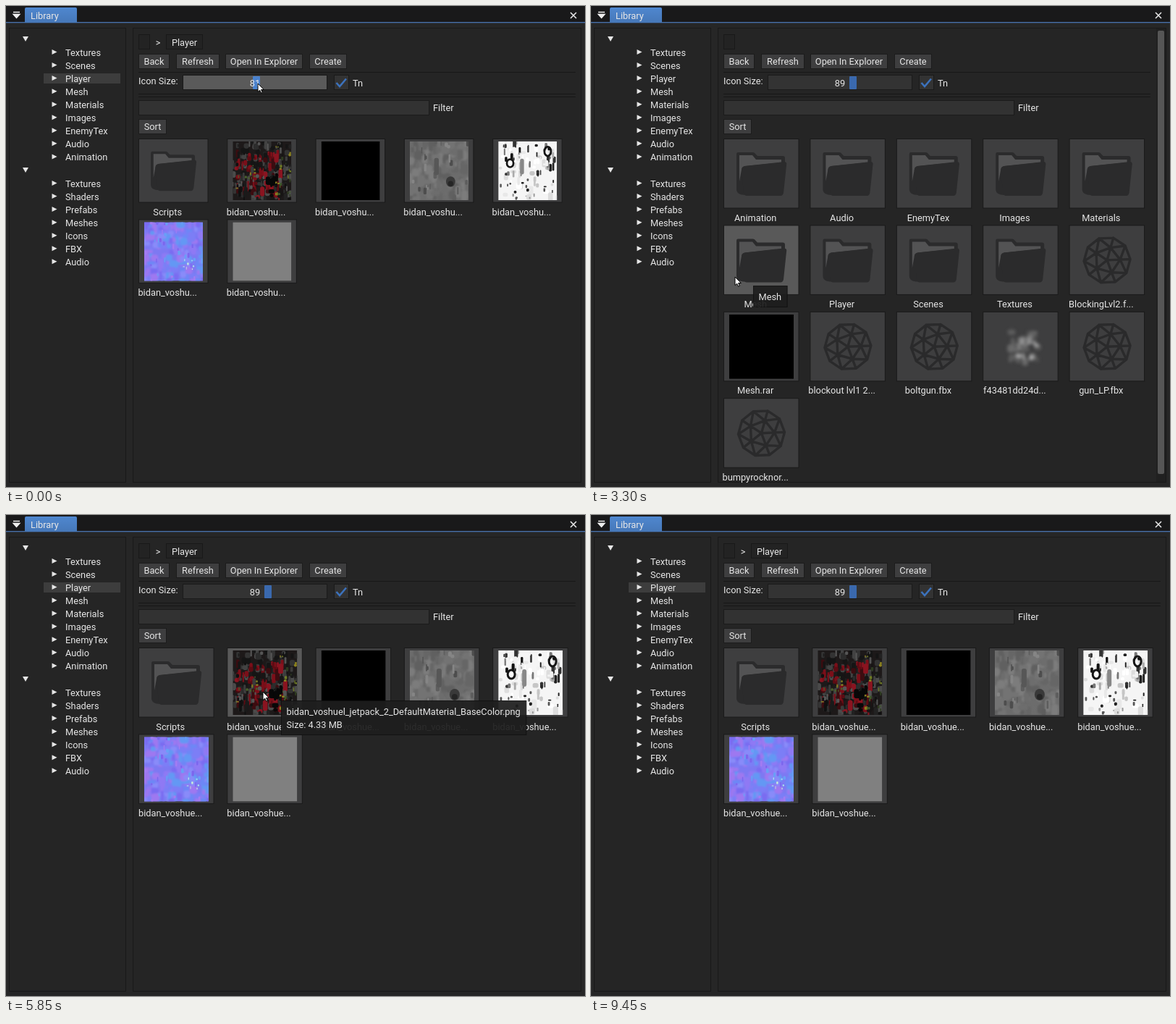
Animation, 800 px wide and 664 px high, one loop 9700 ms. Source, as an HTML page:

```html
<!DOCTYPE html>
<html lang="en">
<head>
<meta charset="utf-8">
<title>Library browser</title>
<style>
html, body { margin: 0; width: 100%; height: 100%; overflow: hidden; background: #262626; }
svg { display: block; }
#stage { width: 800px; height: 664px; font: 12.8px Roboto, "Open Sans", sans-serif; fill: #e6e6e6; white-space: pre; }
</style>
</head>
<body>
<svg id="stage" viewBox="0 0 800 664">
  <defs id="defs"></defs>
  <g id="chrome"></g>
  <g id="view"></g>
</svg>
<script>
const LOOP = 9700, STEP = 50;
const byId = id => document.getElementById(id);
const measure = document.createElement('canvas').getContext('2d');
measure.font = '12.8px Roboto, "Open Sans", sans-serif';

// ---------- drawing helpers ----------
const rect = (x, y, w, h, fill, extra = '') =>
  `<rect x="${x}" y="${y}" width="${w}" height="${h}" fill="${fill}" ${extra}/>`;
const path = (d, fill, extra = '') => `<path d="${d}" fill="${fill}" ${extra}/>`;
const text = (x, mid, s, anchor = 'start', extra = '') =>
  `<text x="${x}" y="${mid + 4.5}" text-anchor="${anchor}" ${extra}>${s}</text>`;
const frame = (x, y, w, h, fill, edge = '#171717') =>
  rect(x + .5, y + .5, w - 1, h - 1, fill, `stroke="${edge}"`);
const symbol = (id, body) => `<symbol id="${id}" viewBox="0 0 89 89">${body}</symbol>`;

function random(seed) {
  return () => (seed = (seed * 16807) % 2147483647) / 2147483647;
}

// Scattered rounded dabs of paint inside a region of the 89 px texture.
function dabs(seed, count, colors, w, h, [x0, y0, x1, y1] = [0, 0, 89, 89]) {
  const r = random(seed);
  let out = '';
  for (let i = 0; i < count; i++) {
    const dw = w * (.4 + r()), dh = h * (.4 + r());
    const x = x0 + r() * (x1 - x0) - dw / 2, y = y0 + r() * (y1 - y0) - dh / 2;
    out += rect(x.toFixed(1), y.toFixed(1), dw.toFixed(1), dh.toFixed(1),
      colors[Math.floor(r() * colors.length)], `rx="${(Math.min(dw, dh) * .4).toFixed(1)}"`);
  }
  return out;
}

function meshIcon() {
  const at = (r, i, n) => {
    const a = (i / n) * Math.PI * 2 - 1.3;
    return `${(44.5 + r * Math.cos(a)).toFixed(1)} ${(44.5 + r * Math.sin(a)).toFixed(1)}`;
  };
  let d = '';
  for (let i = 0; i < 10; i++) d += `M${at(32, i, 10)}L${at(32, i + 1, 10)}`;
  for (let i = 0; i < 5; i++) {
    const p = at(18, i, 5);
    d += `M44.5 44.5L${p}L${at(18, i + 1, 5)}`;
    for (let k = -1; k < 2; k++) d += `M${p}L${at(32, 2 * i + k, 10)}`;
  }
  return path(d, 'none', 'stroke="#2a2a2b" stroke-width="3.4" stroke-linecap="round"');
}

function folderIcon() {
  return path('M12 15H33Q35 15 37 18L39 20H74Q77 20 77 23V34L72 74H22Q10 74 10 66V18Q10 15 12 15Z', '#2b2b2c') +
    path('M14 19H32L37 25H72V29L22 34Q18 35 17 39L14 55Z', '#535354') +
    path('M21 34L76 28Q80 28 79 33L75 71Q74 75 71 75H24Q21 75 20 71L17 39Q17 35 21 34Z', '#2b2b2c');
}

function scriptIcon() {
  const bars = [[23, 18, 17], [33, 26, 22], [45, 34, 23], [45, 43, 17], [33, 51, 18], [22, 67, 9]];
  return rect(0, 0, 89, 89, '#fff') +
    rect(14, 8.5, 61, 72, 'none', 'stroke="#262626" stroke-width="5.5"') +
    bars.map(([x, y, w]) => rect(x, y, w, 4.5, '#262626')).join('') +
    `<text x="31" y="83" font-size="37" font-weight="900" letter-spacing="1.5" fill="#9fc24f"
      stroke="#fff" stroke-width="6" paint-order="stroke">C#</text>`;
}

byId('defs').innerHTML =
  `<linearGradient id="tab" x2="0" y2="1"><stop stop-color="#4f87cf"/><stop offset="1" stop-color="#4678b9"/></linearGradient>
   <filter id="soft"><feGaussianBlur stdDeviation="1.3"/></filter>
   <filter id="smoke"><feGaussianBlur stdDeviation="2.2"/></filter>` +
  symbol('folder', folderIcon()) +
  symbol('mesh', meshIcon()) +
  symbol('script', scriptIcon()) +
  symbol('black', rect(0, 0, 89, 89, '#000')) +
  symbol('flat', rect(0, 0, 89, 89, '#808080')) +
  symbol('smokePuff', `<g filter="url(#smoke)" opacity=".75">` +
    dabs(31, 26, ['#555', '#777', '#666'], 9, 9, [30, 22, 72, 66]) +
    dabs(12, 22, ['#aaa', '#ccc', '#888'], 6, 6, [40, 30, 67, 60]) + '</g>') +
  symbol('paint', rect(0, 0, 89, 89, '#1d1919') +
    dabs(71, 170, ['#151515', '#2c2c2c', '#424242', '#333', '#222', '#4b4b4b'], 6, 9) +
    dabs(19, 85, ['#5c0c13', '#7b0f19', '#3c0c10', '#8a1420', '#171515'], 5, 12, [4, 18, 76, 84]) +
    dabs(43, 45, ['#101010', '#1a1a1a', '#555', '#3b3b3b'], 4, 8) +
    dabs(58, 24, ['#6d7a25', '#3e5a2a', '#8b8120', '#2e3b20'], 3, 4, [64, 8, 89, 82]) +
    dabs(95, 10, ['#7d7a22', '#48602c'], 3, 4, [5, 30, 35, 75]) +
    dabs(27, 9, ['#080808'], 7, 13, [52, 50, 68, 84])) +
  symbol('grey', rect(0, 0, 89, 89, '#6c6c6c') +
    `<g filter="url(#soft)">` + dabs(37, 130, ['#666', '#737373', '#7b7b7b', '#606060', '#6d6d6d'], 10, 14) + '</g>' +
    dabs(81, 22, ['#555', '#858585', '#4d4d4d', '#5e5e5e'], 4, 9) +
    '<ellipse cx="62" cy="61" rx="7" ry="8" fill="#393939"/><ellipse cx="62" cy="64" rx="4" ry="4" fill="#252525"/>' +
    rect(37, 25, 7, 26, '#575757', 'rx="3"')) +
  symbol('mask', rect(0, 0, 89, 89, '#f5f5f5') +
    dabs(51, 42, ['#ddd', '#e8e8e8', '#c6c6c6', '#fff'], 7, 10) +
    dabs(87, 34, ['#111', '#333', '#777', '#aaa', '#202020'], 4, 9, [3, 2, 86, 52]) +
    dabs(64, 24, ['#fff', '#f2f2f2'], 4, 7, [3, 2, 86, 52]) +
    dabs(39, 20, ['#222', '#555', '#999'], 3, 4, [3, 50, 86, 87]) +
    '<g fill="none" stroke="#151515" stroke-width="3"><ellipse cx="18" cy="33" rx="5" ry="6"/><ellipse cx="75" cy="15" rx="5" ry="7"/></g>' +
    rect(33, 26, 6, 24, '#888', 'rx="3"')) +
  symbol('normal', rect(0, 0, 89, 89, '#7d79f2') +
    `<g filter="url(#soft)">` +
    dabs(29, 200, ['#8f79f4', '#6d87f6', '#9e78f0', '#7a6cf1', '#6398f4', '#898bf9', '#7c7ef6'], 10, 11) + '</g>' +
    dabs(77, 30, ['#68a0f6', '#a37cf2', '#7c66ee'], 3, 6) +
    dabs(15, 7, ['#a6e6ea', '#8fd0f0', '#c9f1d8'], 2, 3, [58, 54, 76, 72]));

// ---------- static window ----------
const TREE = [
  [45, ['Textures', 'Scenes', 'Player', 'Mesh', 'Materials', 'Images', 'EnemyTex', 'Audio', 'Animation']],
  [226, ['Textures', 'Shaders', 'Prefabs', 'Meshes', 'Icons', 'FBX', 'Audio']]
];

byId('chrome').innerHTML =
  rect(0, 0, 800, 664, '#262626') +
  rect(0, 0, 800, 23, '#19191a') + rect(0, 22, 800, 1.4, '#466fa8') +
  path('M26 23V4Q26 2 28 2H96Q98 2 98 4V23Z', 'url(#tab)') +
  text(34, 13, 'Library') +
  path('M10 8.5H19M10 11.5H19L14.5 16.5Z', '#eee', 'stroke="#eee" stroke-width="1.3"') +
  path('M780 9L788 17M788 9L780 17', 'none', 'stroke="#eee" stroke-width="1.5"') +
  frame(4, 30, 162, 628, '#252525', '#191919') + frame(175, 30, 620, 628, '#252525', '#191919');

function tree(selected) {
  let out = selected ? rect(52, 93, 106, 14, '#3d3d3d') : '';
  for (const [y, items] of TREE) {
    out += path(`M23 ${y - 3}H31L27 ${y + 4}Z`, '#e6e6e6');
    items.forEach((name, i) => {
      const mid = y + 19 + i * 18.05;
      out += path(`M63.5 ${mid - 4}V${mid + 3}L70.5 ${mid - .5}Z`, '#e6e6e6') + text(82, mid, name);
    });
  }
  return out;
}

// ---------- folder contents ----------
const STEM = 'bidan_voshuel';
const textureFile = (icon, part, size) =>
  ({ icon, stem: true, tip: [`${STEM}_jetpack_2_DefaultMaterial_${part}.png`, `Size: ${size} MB`] });
const entry = (icon, label, tip = label) => ({ icon, label, tip: [tip] });

const FOLDERS = {
  player: {
    crumbs: ['Player'], pitch: 122.3,
    items: [
      entry('folder', 'Scripts'),
      textureFile('paint', 'BaseColor', '4.33'), textureFile('black', 'Emissive', '0.01'),
      textureFile('grey', 'Height', '1.52'), textureFile('mask', 'Metallic', '1.27'),
      textureFile('normal', 'Normal', '6.18'), textureFile('flat', 'Roughness', '0.02')
    ]
  },
  root: {
    crumbs: [], pitch: 119.4,
    items: [
      ...['Animation', 'Audio', 'EnemyTex', 'Images', 'Materials', 'Mesh', 'Player', 'Scenes', 'Textures']
        .map(name => entry('folder', name)),
      entry('mesh', 'BlockingLvl2.f...'), entry('black', 'Mesh.rar'), entry('mesh', 'blockout lvl1 2...'),
      entry('mesh', 'boltgun.fbx'), entry('smokePuff', 'f43481dd24d...'), entry('mesh', 'gun_LP.fbx'),
      entry('mesh', 'bumpyrocknor...')
    ]
  },
  scripts: {
    crumbs: ['Player', 'Scripts'], pitch: 122.3,
    items: [entry('script', 'PlayerControll...', 'PlayerController.cs')]
  }
};

// ---------- motion ----------
// time, x, y of the pointer tip
const POINTER = [
  [0, 348, 107], [1000, 364, 107], [1100, 364, 108], [1600, 240, 92], [1800, 240, 92],
  [2000, 203, 75], [2350, 203, 75], [2750, 214, 435], [2950, 208, 440], [3300, 199, 374],
  [3700, 345, 350], [3850, 345, 348], [4250, 348, 204], [4600, 348, 205], [4850, 250, 222],
  [5000, 250, 222], [5250, 236, 345], [5450, 240, 376], [5650, 345, 345], [5850, 355, 244],
  [6000, 355, 244], [6450, 255, 230], [7100, 255, 230], [7700, 203, 77], [8050, 203, 77],
  [8550, 500, 350], [9000, 500, 350], [9400, 812, 300], [LOOP, 812, 300]
];

function pointerAt(t) {
  const i = POINTER.findIndex(p => p[0] > t);
  const [t0, x0, y0] = POINTER[i - 1], [t1, x1, y1] = POINTER[i];
  const u = (t - t0) / (t1 - t0), e = t < 1000 ? u : u * u * (3 - 2 * u);
  return [Math.round(x0 + (x1 - x0) * e), Math.round(y0 + (y1 - y0) * e)];
}

const folderAt = t =>
  t >= 2250 && t < 3850 ? 'root' : t >= 6700 && t < 8000 ? 'scripts' : 'player';

// ---------- the view ----------
function render(t) {
  const name = folderAt(t), folder = FOLDERS[name];
  const [px, py] = pointerAt(t);
  const size = Math.round(81 + 8 * Math.min(t / 1000, 1));
  const dragging = t < 1050;
  const over = (x, y, w, h) => px >= x && px < x + w && py >= y && py < y + h;
  const button = (x, y, w, label) =>
    frame(x, y, w, 21, over(x, y, w, 21) ? '#5c5c5c' : '#3e3e3f', '#1c1c1c') +
    text(x + w / 2, y + 10.5, label, 'middle');

  let out = tree(name === 'player') + frame(183, 39, 16, 21, '#232323', '#191919');
  [[210, 221, 51], [283, 294, 55]].slice(0, folder.crumbs.length).forEach(([arrow, x, w], i) => {
    out += text(arrow, 50, '&gt;', 'middle') + frame(x, 39, w, 21, '#232323', '#191919') +
      text(x + w / 2, 50.5, folder.crumbs[i], 'middle');
  });
  out += button(183, 66, 43, 'Back') + button(235, 66, 60, 'Refresh') +
    button(303, 66, 107, 'Open In Explorer') + button(419, 66, 52, 'Create');

  const lineWidth = (name === 'root' ? 773 : 787) - 183;
  for (const y of [91, 121, 125]) out += rect(183, y, lineWidth, 1, '#171717');

  const track = dragging || over(245, 95, 199, 21) ? '#5a5a5a' : '#333';
  out += text(183, 103, 'Icon Size:') + frame(244, 95, 200, 21, track, '#1a1a1a') +
    rect(341 + (size - 81) * 2, 97, 10, 18, dragging ? '#4a82ce' : '#3a69ae', 'rx="1"') +
    text(344, 106, size, 'middle') +
    frame(453, 95, 21, 21, '#333', '#1a1a1a') +
    path('M456.5 106L461 111L470 100.5', 'none', 'stroke="#3c72bd" stroke-width="2.6"') +
    text(479, 106, 'Tn') +
    frame(183, 130, 402, 21, '#323232', '#1b1b1b') + text(590, 140.5, 'Filter') +
    button(183, 156, 39, 'Sort');

  let tip = null;
  folder.items.forEach((item, i) => {
    const x = 183.5 + (i % 5) * folder.pitch, y = 183.5 + Math.floor(i / 5) * (size + 30.4);
    const hot = !dragging && over(x, y, size + 14.5, size + 6.5);
    if (hot) tip = item.tip;
    const label = item.stem ? STEM.slice(0, size < 85 ? 11 : 12) + '...' : item.label;
    out += rect(x, y, size + 14.5, size + 6.5, hot ? '#595959' : '#3e3e3f', 'stroke="#1a1a1a"') +
      `<use href="#${item.icon}" x="${x + 7.5}" y="${y + 3.5}" width="${size}" height="${size}"/>` +
      text(x + size / 2 - .8, y + size + 19.5, label, 'middle');
  });

  if (name === 'root') {
    out += rect(781, 31, 13, 626, '#202020') + rect(783, 34, 9, 612, '#565656', 'rx="2"');
  }
  if (tip) {
    const w = Math.max(...tip.map(s => measure.measureText(s).width)) + 15;
    const x = px + 25, y = py + 12;
    out += rect(x + .5, y + .5, w, 11 + tip.length * 18, '#1e1e1e', 'stroke="#111" opacity=".93"') +
      tip.map((s, i) => text(x + 7.5, y + 15 + i * 18, s)).join('');
  }
  if (px < 800) {
    out += path('M0 0V11.5L2.7 9.2L4.6 13.2L6.4 12.4L4.6 8.5H8.3Z', '#fff',
      `stroke="#000" stroke-width="1" transform="translate(${px} ${py})"`);
  }
  return out;
}

let shown = -1;
function tick(now) {
  const t = Math.floor((now % LOOP) / STEP) * STEP;
  if (t !== shown) {
    shown = t;
    byId('view').innerHTML = render(t);
  }
  requestAnimationFrame(tick);
}
tick(0);
</script>
</body>
</html>
```
